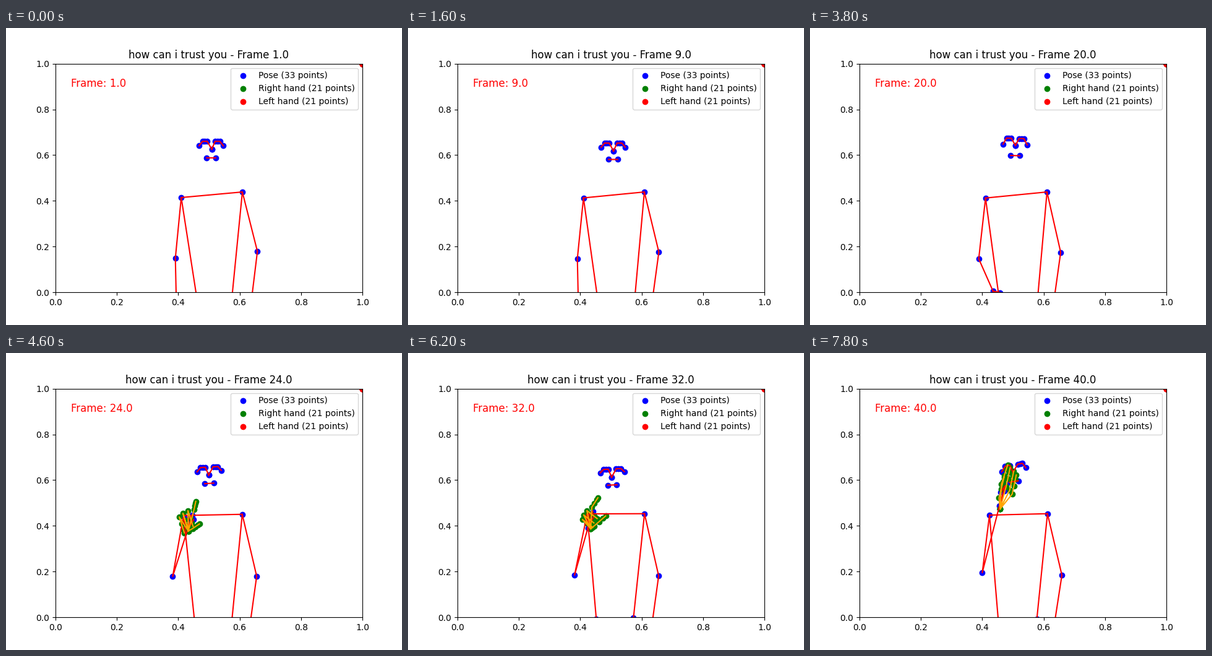
A matplotlib script that plays this animation: 640x480 px, repeating every 8 s.

```python
import numpy as np
import matplotlib.pyplot as plt
from matplotlib.animation import FuncAnimation

FRAMES = 40
W, H = 640, 480
HAND_START = 23      # first detection of the right hand
HAND_LOST = 36       # detection drops out during the quick lift

# Finger settings: angles in degrees above the x axis, lengths in pixels
OPEN = dict(thumb=(8, 30), thumb_bone=(4.4, 34), knuckle=(36, 75),
            spread=(-3, 16), index_bone=(4.5, 78), bone=(9, -72))
FOLDED = dict(thumb=(7, 39), thumb_bone=(8.3, 41), knuckle=(35, 87),
              spread=(-5, 15), index_bone=(6, 57), bone=(7, -38))
LIFTED = dict(thumb=(18, 96), thumb_bone=(11.5, 76), knuckle=(40, 87),
              spread=(-3, -12), index_bone=(11, 72), bone=(10.5, 78))

BODY_CHAINS = [
    ("r_wrist", "r_elbow", "r_shoulder", "l_shoulder", "l_elbow", "l_wrist"),
    ("r_shoulder", "r_hip", "l_hip", "l_shoulder"),
    ("r_wrist", "r_pinky", "r_index", "r_wrist", "r_thumb"),
]


def ramp(n, start, end):
    t = np.clip((n - start) / (end - start), 0, 1)
    return t * t * (3 - 2 * t)


def weights(n):
    """How far each movement has come at frame n."""
    reach = ramp(n, 20, 26)
    return dict(settle=1 - np.exp((1 - n) / 6),
                nod=ramp(n, 16, 20) - reach,
                reach=reach,
                swing=ramp(n, 17.5, 25),
                rest=ramp(n, 27, 32),
                lift=ramp(n, 33, 40))


def mix(w, base, **moves):
    return np.array(base, float) + sum(
        w[k] * np.array(v, float) for k, v in moves.items())


def polar(length, degrees):
    a = np.radians(degrees)
    return length * np.array([np.cos(a), -np.sin(a)])


def face_parts(w):
    """Chains of each face side from the nose, and the mouth."""
    x, y = mix(w, (331.6, 196), settle=(0, 4), nod=(0, -10),
               reach=(-4.3, 0), rest=(2.8, 1), lift=(-0.8, -8))
    pitch, yaw, roll = mix(
        w, (0.15, 0.9, 0), settle=(-0.15, -0.5, 0), nod=(1, 0, 0.03),
        reach=(-0.35, -1.7, -0.09), rest=(0, 0.2, 0.04),
        lift=(0.8, 0, -0.12))

    def spot(dx, dy):
        return x + dx, y + dy + roll * dx

    brow, ear, jaw = 1.5 * pitch - 13, 5 * pitch - 6.5, 3 * pitch + 13.4
    sides = [[(x + yaw, y)]
             + [spot(s * d, brow) for d in (6.3, 10.3, 14)]
             + [spot(s * 19.5, ear)] for s in (1, -1)]
    return sides + [[spot(7.3, jaw), spot(-7.3, jaw)]]


def body_joints(w):
    wrist = mix(w, (276, 477), swing=(14.5, -200), rest=(0.3, 5.5),
                lift=(15.5, -36))
    wrist[0] += 22 * np.sin(np.pi * w["swing"])
    return dict(
        l_shoulder=mix(w, (382, 265), nod=(1, 0), reach=(-0.6, -5.8),
                       rest=(0.8, 0.5), lift=(1.6, 0)),
        r_shoulder=mix(w, (283.2, 274), settle=(0.5, 0.8),
                       reach=(4.5, -16.5), rest=(1.4, 1.7), lift=(0.5, 2)),
        l_elbow=mix(w, (406.3, 361), settle=(-1.2, 1.6),
                    reach=(0, -2.5), lift=(2, -1)),
        r_elbow=mix(w, (273.7, 372), settle=(0, 1), nod=(-1, 0),
                    reach=(-5.5, -16), rest=(0.9, 2), lift=(9.3, -4)),
        l_wrist=mix(w, (393, 470), settle=(-3, 0)),
        r_wrist=wrist,
        r_thumb=wrist + mix(w, (12, 10), swing=(-2, -29), lift=(-2, -5)),
        r_index=wrist + mix(w, (10, 28), swing=(-2, -55), lift=(1, -5)),
        r_pinky=wrist + mix(w, (4, 26), swing=(-2, -48)),
        l_hip=mix(w, (364.7, 440), settle=(2, 0), nod=(1, 0),
                  reach=(-2.3, -12.8), rest=(0, 0.9), lift=(2.2, 2)),
        r_hip=mix(w, (309, 440), settle=(-3, 0), reach=(-2, -11),
                  rest=(0.3, 1), lift=(0, 2)))


def hand_fingers(w, wrist):
    """Five chains from the wrist, thumb first."""
    hand = {k: np.array(OPEN[k]) * (1 - w["rest"])
            + np.array(FOLDED[k]) * (w["rest"] - w["lift"])
            + np.array(LIFTED[k]) * w["lift"] for k in OPEN}
    root = wrist + mix(w, (1.5, 1), rest=(3, 0.5), lift=(-3.5, 4))
    fingers = []
    for i in range(5):
        if i == 0:
            base, bone = hand["thumb"], hand["thumb_bone"]
        else:
            base = hand["knuckle"] + (i - 1) * hand["spread"]
            bone = hand["index_bone"] if i == 1 else hand["bone"]
        chain = [root, root + polar(*base)]
        for taper in (1.3, 1, 0.7):
            chain.append(chain[-1] + polar(bone[0] * taper, bone[1]))
        fingers.append(chain)
    return fingers


def to_data(points):
    p = np.asarray(points, float)
    return np.column_stack([(p[:, 0] - 80) / 496, (427.2 - p[:, 1]) / 369.6])


def polyline(chains):
    """Join chains of points into one path with gaps between them."""
    gap = [(np.nan, np.nan)]
    path = np.vstack([part for c in chains for part in (to_data(c), gap)])
    return path[:, 0], path[:, 1]


fig, ax = plt.subplots(figsize=(W / 100, H / 100), dpi=100)
ax.set_xlim(0, 1)
ax.set_ylim(0, 1)
title = ax.set_title("")
label = ax.text(0.05, 0.9, "", fontsize=12, color="red")
pose_dots = ax.scatter([], [], c="blue", label="Pose (33 points)")
right_dots = ax.scatter([], [], c="green", label="Right hand (21 points)")
left_dots = ax.scatter([1] * 21, [1] * 21, c="red",
                       label="Left hand (21 points)")
pose_line, = ax.plot([], [], color="red")
hand_line, = ax.plot([], [], color="orange")
ax.legend(loc="upper right")


def update(i):
    n = i + 1
    w = weights(n)
    title.set_text(f"how can i trust you - Frame {n:.1f}")
    label.set_text(f"Frame: {n:.1f}")

    face, body = face_parts(w), body_joints(w)
    pose_dots.set_offsets(to_data(np.vstack(face + [list(body.values())])))
    pose_line.set_data(*polyline(
        face + [[body[k] for k in c] for c in BODY_CHAINS]))

    if n < HAND_START or n == HAND_LOST:
        right_dots.set_offsets(np.ones((21, 2)))
        hand_line.set_data([], [])
    else:
        fingers = hand_fingers(w, body["r_wrist"])
        right_dots.set_offsets(to_data(np.vstack(fingers)))
        hand_line.set_data(*polyline(fingers))
    return title, label, pose_dots, right_dots, pose_line, hand_line


anim = FuncAnimation(fig, update, frames=FRAMES, interval=200, repeat=True,
                     repeat_delay=0, blit=False)
plt.show()
```
